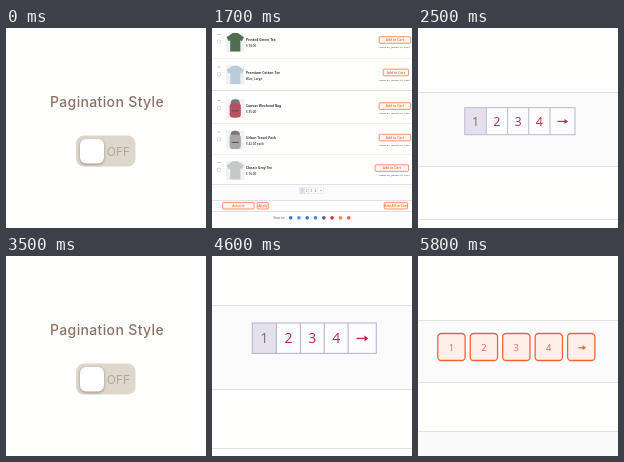
An HTML page with a canvas that plays this animation: 200x200 px, repeating every 7100 ms.

```html
<!DOCTYPE html>
<html lang="en">
<head>
<meta charset="utf-8">
<title>Pagination style</title>
<style>
html, body { margin: 0; width: 100%; height: 100%; overflow: hidden; background: #fefefd; }
canvas { display: block; width: 100vw; height: 100vh; }
</style>
</head>
<body>
<canvas id="stage"></canvas>
<script>
const SIZE = 200, LOOP = 7100, STEP = 100;
const PAPER = '#fefefd', BAND = '#fbfbfc', RULE = '#e1e1e7', ORANGE = '#f26a3a';
const SANS = '"Open Sans", "Noto Sans", sans-serif';
const canvas = document.getElementById('stage');
const ctx = canvas.getContext('2d');
const dpr = window.devicePixelRatio || 1;
canvas.width = canvas.height = SIZE * dpr;

const clamp = v => Math.min(1, Math.max(0, v));
const mix = (a, b, p) => a + (b - a) * p;
const easeInOut = u => u < 0.5 ? 2 * u * u : 1 - 2 * (1 - u) ** 2;
const easeOut = u => 1 - (1 - u) ** 3;
const mixColor = (a, b, p) => `rgb(${a.map((v, i) => Math.round(mix(v, b[i], p)))})`;

function rect(x, y, w, h, color) {
  ctx.fillStyle = color;
  ctx.fillRect(x, y, w, h);
}

function box(x, y, w, h, r, fill, stroke, line = 1) {
  ctx.beginPath();
  ctx.roundRect(x, y, w, h, r);
  if (fill) { ctx.fillStyle = fill; ctx.fill(); }
  if (stroke) { ctx.strokeStyle = stroke; ctx.lineWidth = line; ctx.stroke(); }
}

function label(text, x, y, font, color, align = 'left') {
  ctx.font = font;
  ctx.fillStyle = color;
  ctx.textAlign = align;
  ctx.fillText(text, x, y);
}

function dot(x, y, r, color) {
  ctx.beginPath();
  ctx.arc(x, y, r, 0, Math.PI * 2);
  ctx.fillStyle = color;
  ctx.fill();
}

function shape(points, color) {
  ctx.beginPath();
  points.forEach(([x, y]) => ctx.lineTo(x, y));
  ctx.fillStyle = color;
  ctx.fill();
}

function arrow(x, y, w, color) {
  rect(x, y - 0.6, w - 1.5, 1.2, color);
  shape([[x + w, y], [x + w - 3.5, y - 2.5], [x + w - 3.5, y + 2.5]], color);
}

// Horizontal bands and hairlines are snapped to whole stage pixels.
function bands(top, bottom, next, below) {
  [top, bottom, next] = [top, bottom, next].map(Math.round);
  rect(0, top, SIZE, bottom - top, BAND);
  rect(0, next, SIZE, SIZE, below);
  [top, bottom, next].forEach(y => rect(0, y, SIZE, 1, RULE));
}

function drawToggle(on) {
  ctx.letterSpacing = '0.35px';
  label('Pagination Style', 101, 79, '500 14px Inter, sans-serif', '#8b7268', 'center');
  ctx.letterSpacing = '0px';
  box(70, 107.5, 59.5, 31, 8, mixColor([222, 215, 204], [196, 164, 132], on));
  const font = '12px Inter, sans-serif';
  ctx.globalAlpha = 1 - on;
  label('OFF', 112.5, 127.5, font, '#b3a79b', 'center');
  ctx.globalAlpha = on;
  label('ON', 87, 127.5, font, '#ffffff', 'center');
  ctx.globalAlpha = 1;
  ctx.save();
  ctx.shadowColor = 'rgba(90,75,65,.55)';
  ctx.shadowBlur = 3 * dpr;
  ctx.shadowOffsetY = dpr;
  box(mix(74, 102, on), 111, 24, 24.5, 6, '#ffffff');
  ctx.restore();
}

function tee(y, color) {
  shape([[22, y], [27, y], [33, y + 4], [31, y + 8], [29.5, y + 7], [29.5, y + 18],
    [19.5, y + 18], [19.5, y + 7], [18, y + 8], [16, y + 4]], color);
}

function backpack(y, color) {
  box(20, y, 9, 18, 4, '#77777c');
  box(19, y + 4, 11, 14, 3, color);
  rect(21, y + 11, 7, 1, '#5d4a50');
}

const ITEMS = [
  { y: 8, art: y => tee(y, '#506d50'), name: 'Printed Green Tee', price: '$ 18.00', x: 166, w: 31 },
  { y: 40, art: y => tee(y, '#b9cbd8'), name: 'Premium Cotton Tee', price: 'Blue, Large', x: 170, w: 25 },
  { y: 73, art: y => backpack(y, '#b8505f'), name: 'Canvas Weekend Bag', price: '$ 35.00', x: 166, w: 31 },
  { y: 104, art: y => backpack(y, '#a9a4a8'), name: 'Urban Travel Pack', price: '$ 42.00 each', x: 166, w: 31 },
  { y: 134, art: y => tee(y, '#c6c8ca'), name: 'Classic Grey Tee', price: '$ 16.00', x: 162, w: 33 }
];

function button(text, x, y, w) {
  box(x, y, w, 6.5, 1, '#fff4ef', ORANGE, 0.7);
  label(text, x + w / 2, y + 4.5, `600 3.3px ${SANS}`, ORANGE, 'center');
}

function drawItem({ y, art, name, price, x, w }) {
  rect(7, y + 1, 3, 0.6, '#999');
  box(7, y + 7, 3, 3, 0.5, null, '#aaa', 0.4);
  rect(15.5, y, 18, 18.5, '#f1f2f3');
  art(y);
  label(name, 35, y + 8, `700 3.3px ${SANS}`, '#33373c');
  label(price, 35, y + 14, `600 3px ${SANS}`, '#33373c');
  button('Add to Cart', x, y + 3.5, w);
  label('Added on: January 20, 2023', 196, y + 15, `2.4px ${SANS}`, '#333', 'right');
}

function drawPager() {
  const edges = [47, 68.4, 89.7, 110.8, 132, 157], line = '#bab7d2', red = '#c32549';
  rect(47, 80, 110, 27, '#fdfcff');
  rect(47, 80, 21.4, 27, '#e5e1ec');
  ctx.strokeStyle = line;
  ctx.lineWidth = 1;
  ctx.strokeRect(47, 80, 110, 27);
  edges.slice(1, 5).forEach(x => rect(x - 0.5, 80, 1, 27, line));
  for (let i = 0; i < 4; i++) {
    label(i + 1, (edges[i] + edges[i + 1]) / 2, 98.2, `12.5px ${SANS}`, i ? red : '#77747e', 'center');
  }
  arrow(139.5, 93.7, 10.5, red);
}

// The list page; p goes from the whole page to the close view of its pager.
function drawListPage(p) {
  const scale = mix(1, 5.41, p), cx = mix(99.5, 102.3, p), cy = mix(163, 82.2, p);
  const toY = y => cy + (y - 163) * scale;
  bands(toY(156.9), toY(172.3), toY(183.3), '#fdfdfd');
  [32, 64, 96, 127].forEach(y => rect(0, Math.round(toY(y)), SIZE, 1, y === 64 ? '#dfdfe2' : '#f0f0f2'));

  ctx.save();
  ctx.translate(cx, cy);
  ctx.scale(scale, scale);
  ctx.save();
  ctx.translate(-99.5, -163);
  ITEMS.forEach(drawItem);
  button('Actions', 12, 174.5, 31);
  button('Apply', 46, 174.5, 11);
  button('Add All to Cart', 171, 174.5, 23);
  label('Share on:', 62, 190.5, `2.6px ${SANS}`, '#555');
  ['#3b6fd4', '#35a6e8', '#3c78c8', '#3a8ad8', '#56617c', '#d8343c', '#f08a45', '#ee6040']
    .forEach((color, i) => dot(79 + i * 8.15, 189.7, 1.8, color));
  ctx.restore();
  ctx.scale(1 / 4.8, 1 / 4.8);
  ctx.translate(-102, -93.5);
  drawPager();
  ctx.restore();
}

// The restyled pager; p goes from the close view to the wider one.
function drawStyledPage(p) {
  const scale = mix(1.39, 1, p), midY = 102.5;
  const toY = y => midY + (y - midY) * scale;
  bands(toY(64), toY(126), toY(175), '#fafafa');
  const border = mixColor([250, 160, 132], [240, 100, 52], p);
  const ink = mixColor([244, 160, 136], [226, 108, 72], p);
  ctx.save();
  ctx.translate(0, midY);
  ctx.scale(scale, scale);
  ctx.translate(0, -midY);
  for (let i = 0; i < 5; i++) {
    const x = 19.8 + i * 32.45;
    box(x, 77.5, 27.3, 27, 3.5, '#feefe9', border, 1.3);
    if (i < 4) label(i + 1, x + 13.6, 94.7, `9.5px ${SANS}`, ink, 'center');
    else arrow(x + 10.5, 91.8, 8, ink);
  }
  ctx.restore();
}

function draw(time) {
  const t = Math.floor(time / STEP) * STEP;
  ctx.setTransform(dpr, 0, 0, dpr, 0, 0);
  rect(0, 0, SIZE, SIZE, PAPER);
  if (t < 1000) drawToggle(0);
  else if (t < 3500) drawListPage(t < 1700 ? 0 : easeInOut(clamp((t - 1650) / 1150)));
  else if (t < 4600) drawToggle(easeInOut(clamp((t - 3500) / 500)));
  else if (t < 5000) drawListPage(1);
  else drawStyledPage(easeOut(clamp((t - 5200) / 600)));
}

const start = performance.now();
function tick() {
  draw((performance.now() - start) % LOOP);
  requestAnimationFrame(tick);
}
tick();
</script>
</body>
</html>
```
